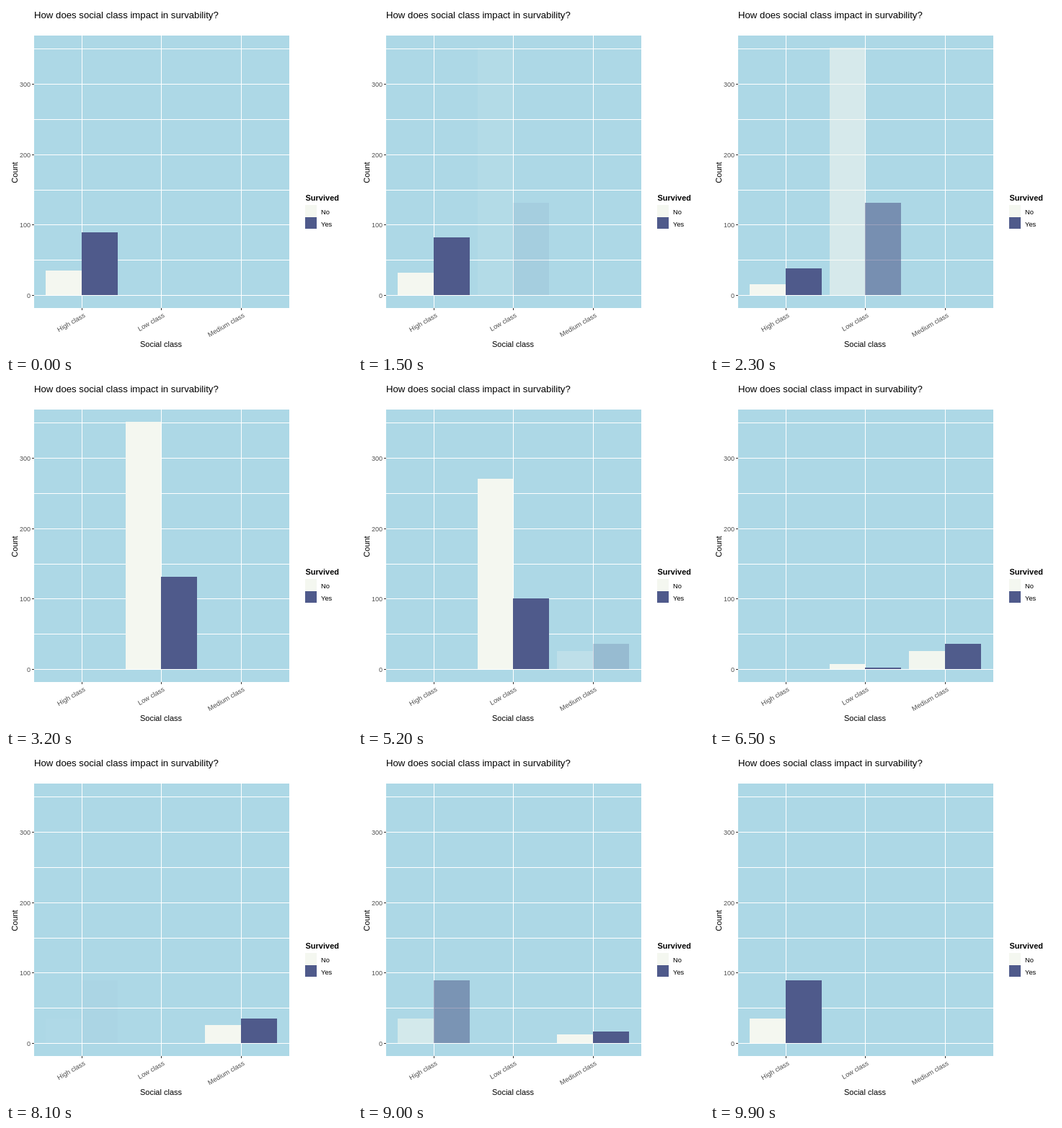
Recreate the animation shown at these times as an HTML page with a canvas. Size 480 by 480 pixels, loop 10000 ms.

```html
<!DOCTYPE html>
<html lang="en">
<head>
<meta charset="utf-8">
<title>Social class chart</title>
<style>
  html, body { margin: 0; width: 100%; height: 100%; overflow: hidden; background: #fff; }
  canvas { display: block; width: 480px; height: 480px; }
</style>
</head>
<body>
<canvas id="stage" width="480" height="480"></canvas>
<script>
const ctx = document.getElementById('stage').getContext('2d');

const LOOP = 10000, STEP = 100;
const BASE = 401.1, UNIT = 0.977;
const PANEL = { x: 39, y: 41, w: 354, h: 378 };
const NO = '#f4f7f0', YES = '#4f5a8b';

// x holds the left, middle and right edges of each pair of bars
const groups = [
  { label: 'High class', x: [55, 105, 155], counts: [35, 89] },
  { label: 'Low class', x: [166, 215, 265], counts: [351, 131] },
  { label: 'Medium class', x: [276, 326, 376], counts: [26, 36] }
];

// Transition i leads from group i to the next one; times are in steps
const moves = [[11, 33], [45, 67], [79, 100]];

const ease = p => (1 - Math.cos(Math.PI * p)) / 2;
const yOf = count => BASE - count * UNIT;

function rect(color, x, y, w, h) {
  ctx.fillStyle = color;
  ctx.fillRect(x, y, w, h);
}

function text(str, x, y, { size = 11, color = '#000', align = 'left', angle = 0, weight = 'normal' } = {}) {
  ctx.save();
  ctx.translate(x, y);
  ctx.rotate(angle * Math.PI / 180);
  ctx.font = `${weight} ${size}px "Liberation Sans", Arial, sans-serif`;
  ctx.textAlign = align;
  ctx.fillStyle = color;
  ctx.fillText(str, 0, 0);
  ctx.restore();
}

function drawPanel() {
  rect('#fff', 0, 0, 480, 480);
  rect('#add8e6', PANEL.x, PANEL.y, PANEL.w, PANEL.h);
  for (let n = 0; n <= 350; n += 50) {
    const y = Math.round(yOf(n));
    rect('#fff', PANEL.x, y, PANEL.w, 1);
    if (n % 100 === 0) {
      rect('#333', 36, y, 3, 1);
      text(n, 34, y + 4, { size: 9, color: '#4d4d4d', align: 'right' });
    }
  }
  for (const { label, x } of groups) {
    rect('#fff', x[1], PANEL.y, 1, PANEL.h);
    rect('#333', x[1], PANEL.y + PANEL.h, 1, 3);
    text(label, x[1] + 5.5, 431, { size: 9.3, color: '#4d4d4d', align: 'right', angle: -30 });
  }
}

function drawLabels() {
  text('How does social class impact in survability?', 39, 17, { size: 13.2 });
  text('Social class', 215, 473, { align: 'center' });
  text('Count', 15.5, 231, { align: 'center', angle: -90 });
  text('Survived', 415.5, 270, { weight: 'bold' });
  rect(NO, 415, 276, 16, 17);
  rect(YES, 415, 293, 16, 16);
  text('No', 437, 289, { size: 9.4 });
  text('Yes', 437, 306, { size: 9.4 });
}

function drawBars({ x, counts }, scale, alpha) {
  ctx.globalAlpha = alpha;
  counts.forEach((count, i) => {
    const top = Math.round(yOf(count * scale));
    rect(i ? YES : NO, x[i], top, x[i + 1] - x[i], 401 - top);
  });
  ctx.globalAlpha = 1;
}

function draw(time) {
  const step = Math.floor((time % LOOP) / STEP);
  drawPanel();
  drawLabels();

  let current = 0;
  for (let i = 0; i < moves.length; i++) {
    const [start, end] = moves[i];
    if (step >= end) {
      current = i + 1;
    } else if (step > start) {
      const p = ease((step - start) / (end - start));
      drawBars(groups[i], 1 - p, 1);
      drawBars(groups[(i + 1) % groups.length], 1, p);
      return;
    }
  }
  drawBars(groups[current], 1, 1);
}

const began = performance.now();
function tick() {
  draw(performance.now() - began);
  requestAnimationFrame(tick);
}
tick();
</script>
</body>
</html>
```
